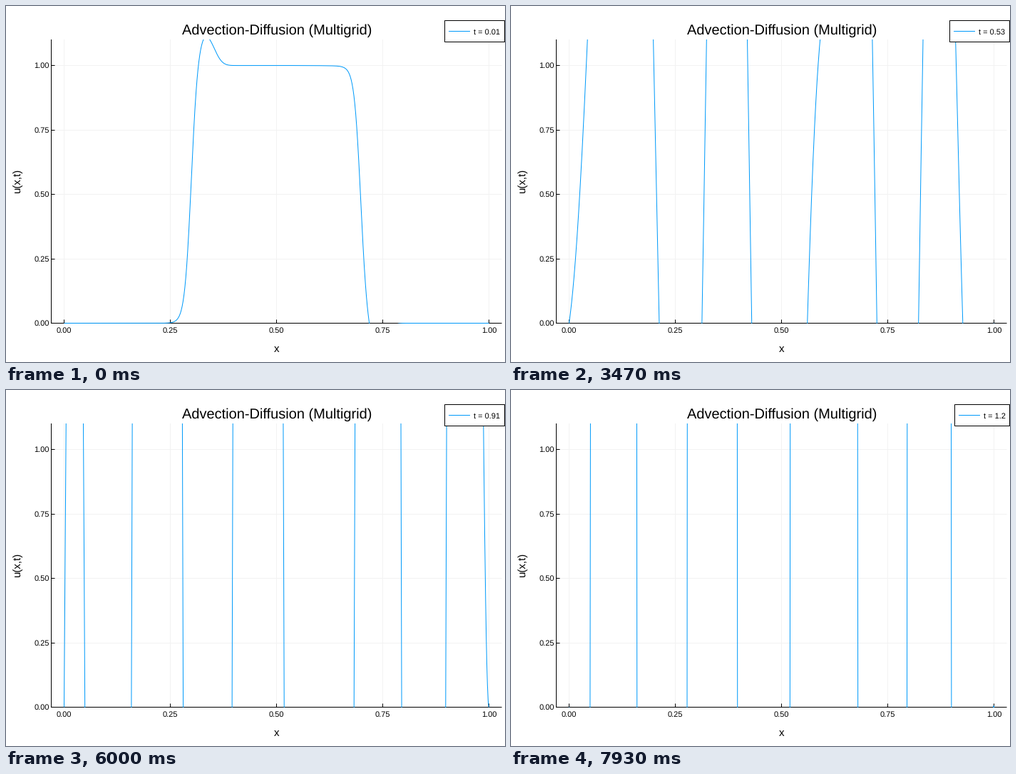
Write a matplotlib script that moves like this. It is 700 px wide and 500 px high and loops after 8000 ms.

```python
import matplotlib.pyplot as plt
import numpy as np
from matplotlib.animation import FuncAnimation
from matplotlib.patches import Rectangle

W, H, DPI = 700, 500, 100
STEPS, LOOP_MS, TICK_MS = 120, 8000, 20
PX = 72 / DPI
BLUE = "#009afa"
LEFT, RIGHT, TOP, BOTTOM = 63.5, 695.5, 47, 445.5
X0, X_UNIT, Y_UNIT = 81.5, 596, 362

plt.rcParams["font.family"] = "Liberation Sans"
plt.rcParams["text.hinting"] = "none"

x = np.linspace(0, 1, 1401)


def sigmoid(z):
    return 1 / (1 + np.exp(-np.clip(z, -60, 60)))


def bell(center, width):
    return np.exp(-((x - center) / width) ** 2)


# Phase in half waves; the two wave trains meet near x = 0.62
PHASE = (8.15 * x + 2.833 * (x - .45) ** 3 - .235
         - .37 * sigmoid((x - .62) / .03))
EDGES = np.tanh(x / .09) * np.tanh((1 - x) / .1)
NOTCH = 1 - .45 * bell(.62, .05)


def profile(t):
    """Drifting plateau plus a growing wave that travels left."""
    age = t - .01
    blur = .03 * (1 - np.exp(-6.2 * t - .235))
    front = sigmoid((x - .302 + .36 * t + .31 * t * t) / blur)
    plateau = sigmoid((.7035 - .58 * t - x) / (blur + .04 * age))

    # Wave packets start at both jumps and spread out
    spread = .03 + .35 * age + 1.05 * age ** 2
    packets = 1 - (1 - bell(.33, spread)) * (1 - bell(.73, spread))
    growth = .315 * np.exp(4.7 * age) * (1 - .6 * np.exp(-age / .06))

    chirp = .13 * (t / .25) * np.exp(1 - t / .25)
    phase = (PHASE + (t - .91) / .29
             + chirp * np.sin(2 * np.pi * (x - .37) / .4))
    wave = -np.sin(np.pi * np.maximum(phase, -.5))
    return EDGES * front * (plateau + growth * packets * NOTCH * wave)


def to_px(u, v):
    return X0 + X_UNIT * u, BOTTOM - Y_UNIT * v


fig = plt.figure(figsize=(W / DPI, H / DPI), dpi=DPI, facecolor="white")
ax = fig.add_axes([0, 0, 1, 1])
ax.set_xlim(0, W)
ax.set_ylim(H, 0)
ax.axis("off")


def line(xs, ys, color="black", z=2):
    return ax.plot(xs, ys, color=color, lw=PX, zorder=z, snap=False,
                   solid_capstyle="butt")[0]


def label(px, py, text, size, ha="center", **kw):
    return ax.text(px, py, text, fontsize=size * PX, ha=ha, va="baseline",
                   color="black", **kw)


for v in np.arange(5) / 4:
    gx, gy = to_px(v, v)
    gy = np.floor(gy) + .5
    line([gx, gx], [TOP, BOTTOM], "#f2f2f2", 1)
    line([LEFT, RIGHT], [gy, gy], "#f2f2f2", 1)
    line([gx, gx], [BOTTOM, BOTTOM - 5])
    line([LEFT, LEFT + 5], [gy, gy])
    label(gx, 459, f"{v:.2f}", 11)
    label(60.8, gy + 3.7, f"{v:.2f}", 11, ha="right")

line([LEFT, LEFT], [TOP, BOTTOM + .5])
line([LEFT - .5, RIGHT], [BOTTOM, BOTTOM])
label(380, 40, "Advection-Diffusion (Multigrid)", 20)
label(379.7, 486, "x", 15)
label(20, 246, "u(x,t)", 15, rotation=90, rotation_mode="anchor")

curve = line([], [], BLUE, 4)
curve.set_clip_path(Rectangle((LEFT, TOP), RIGHT - LEFT, BOTTOM - TOP + .3,
                              transform=ax.transData))

box = ax.add_patch(Rectangle((615.5, 20.5), 84, 30, fc="white", ec="black",
                             lw=PX, zorder=6, snap=False))
sample = line([], [], BLUE, 7)
caption = label(656, 40, "", 11, ha="left", zorder=7)


def update(n):
    # The time step advances every LOOP_MS / STEPS, on a finer clock
    step = int((n * TICK_MS + 14) * STEPS / LOOP_MS)
    t = round(.01 * (step + 1), 2)
    curve.set_data(*to_px(x, profile(t)))
    text = f"t = {t}"
    left = 615.5 + 7 * (len(text) < 8) + text.endswith("11")
    box.set_x(left)
    box.set_width(699.5 - left)
    sample.set_data([left + 5.5, left + 35.5], [35.5, 35.5])
    caption.set_text(text)
    caption.set_x(left + 40.5)
    return curve, box, sample, caption


anim = FuncAnimation(fig, update, frames=LOOP_MS // TICK_MS, interval=TICK_MS,
                     repeat=True, repeat_delay=0, blit=False)
plt.show()
```
